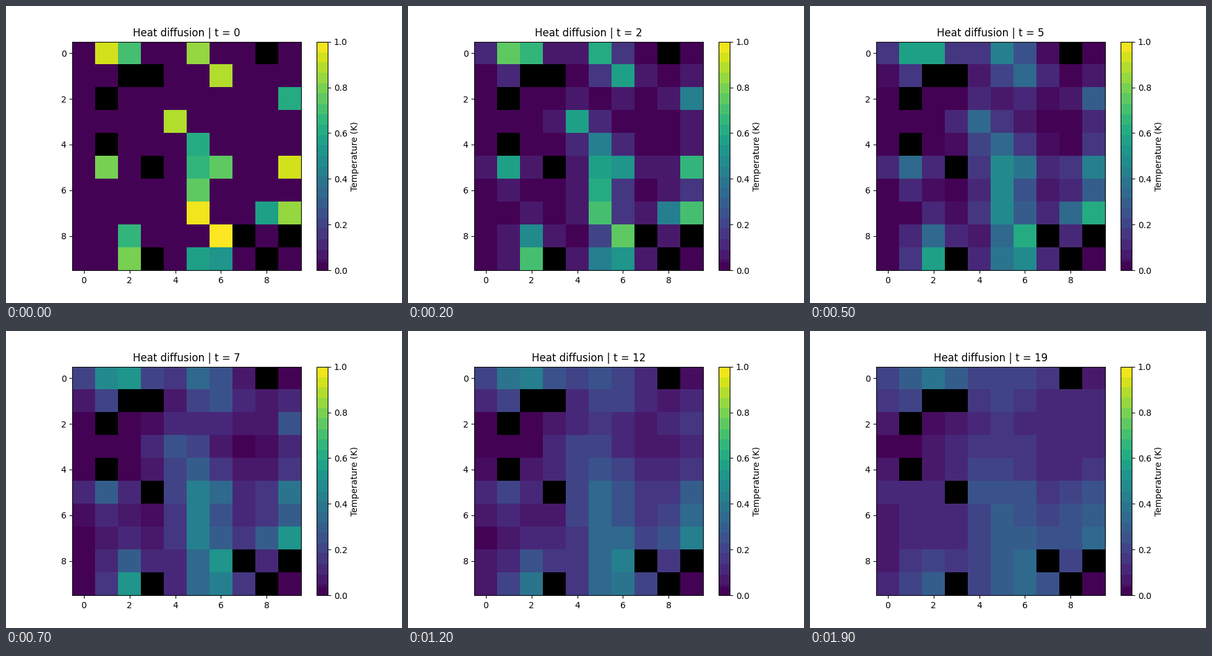
Recreate the animation shown at these times as a matplotlib script. Size 640x480 px, loop 2 s.

```python
import numpy as np
import matplotlib.pyplot as plt
from matplotlib.animation import FuncAnimation
from matplotlib.colors import ListedColormap

SIZE, FRAMES, STEP_MS = 10, 20, 100
LAST_STEP = 18  # the field rests after this step
RATE = 0.054
BANDS = 22

# Cells are numbered row by row; hot cells run from hottest to coolest.
WALLS = [8, 12, 13, 21, 41, 53, 87, 89, 93, 98]
HOT = [86, 75, 1, 59, 34, 16, 5, 79, 92, 51,
       65, 56, 2, 82, 55, 29, 45, 78, 95, 96]
HOTTEST, COOLEST = 1.0, 0.53


def banded_viridis():
    """Viridis in even steps, with a finer split at the cold end."""
    x = (np.arange(256) + 0.5) / 256
    mid = (np.floor(x * BANDS) + 0.5) / BANDS
    cold = x < 1 / BANDS
    mid[cold] = np.where(x[cold] < 0.036, 0.006, 0.034)
    mid[-1] = 1.0
    cmap = ListedColormap(plt.get_cmap("viridis")(mid))
    cmap.set_bad("black")
    return cmap


def diffuse(temp, is_open):
    """One explicit step; walls and borders let no heat through."""
    flow = np.zeros_like(temp)
    # Transposed views handle the vertical and the horizontal neighbours.
    for t, o, f in ((temp, is_open, flow), (temp.T, is_open.T, flow.T)):
        exchange = (t[1:] - t[:-1]) * o[1:] * o[:-1]
        f[:-1] += exchange
        f[1:] -= exchange
    return temp + RATE * flow


def simulate():
    temp = np.zeros((SIZE, SIZE))
    is_open = np.ones((SIZE, SIZE), dtype=bool)
    temp.flat[HOT] = np.linspace(HOTTEST, COOLEST, len(HOT))
    is_open.flat[WALLS] = False
    fields = []
    for _ in range(LAST_STEP + 1):
        fields.append(np.ma.array(temp, mask=~is_open))
        temp = diffuse(temp, is_open)
    return fields


fields = simulate()
fig, ax = plt.subplots(figsize=(6.4, 4.8), dpi=100)
image = ax.imshow(fields[0], cmap=banded_viridis(), vmin=0, vmax=1,
                  interpolation="nearest")
fig.colorbar(image, ax=ax, label="Temperature (K)")
title = ax.set_title("Heat diffusion | t = 0")


def draw(t):
    image.set_data(fields[min(t, LAST_STEP)])
    title.set_text(f"Heat diffusion | t = {t}")
    return image, title


anim = FuncAnimation(fig, draw, frames=FRAMES, interval=STEP_MS,
                     repeat=True, repeat_delay=0)
plt.show()
```
